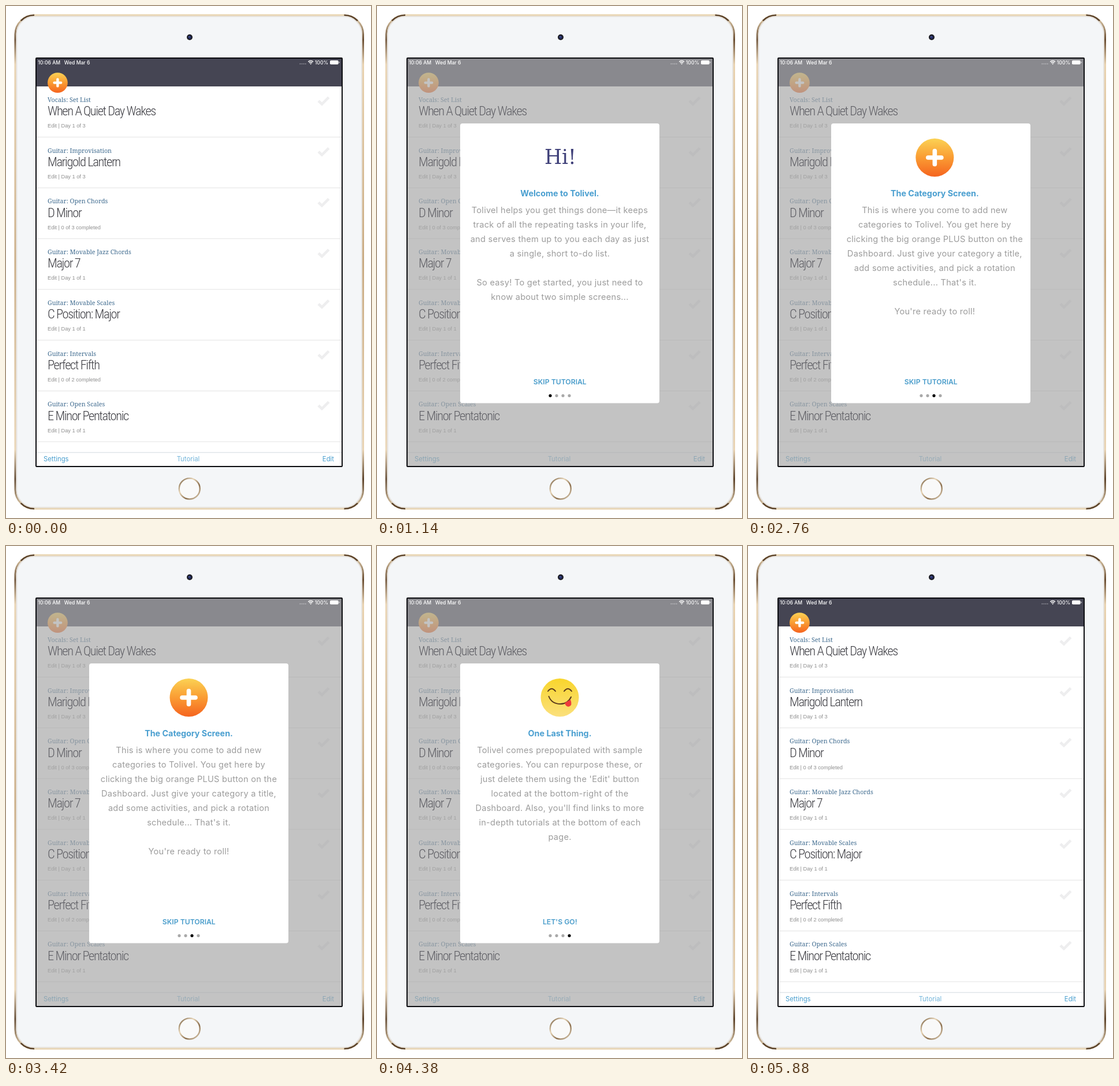
Recreate the animation shown at these times as an HTML page. Size 632 px wide and 885 px high, loop 5940 ms.

```html
<!DOCTYPE html>
<html lang="en">
<head>
<meta charset="utf-8">
<title>Task list tutorial</title>
<style>
  html, body { margin: 0; width: 100%; height: 100%; overflow: hidden; background: #fff; }
  svg { display: block; width: 100vw; height: 100vh; }
  text { font-family: Inter, Roboto, sans-serif; white-space: pre; }
  .cat { font: 10.7px "Noto Serif", serif; fill: #3f6b8f; }
  .name { font-family: "Roboto Condensed", Roboto, "Open Sans", sans-serif;
          font-size: 22.5px; font-weight: 300; font-stretch: 75%; letter-spacing: -1.4px; }
  .sub { font: 9.25px "Liberation Sans", Arial, sans-serif; fill: #8e8e8e; }
  .status { font-size: 8.6px; font-weight: 500; fill: #fff; }
  .link { font-size: 11.3px; fill: #4a9fcf; }
  .mid { text-anchor: middle; }
  .head { font-size: 14.3px; font-weight: 700; fill: #4a9fd0; }
  .body { font-size: 14.6px; letter-spacing: .25px; fill: #9c9c9c; }
  .hi { font: 34.5px "DejaVu Serif", serif; fill: #3f4079; }
  .skip { font-size: 12.2px; font-weight: 600; fill: #4a9dcb; }
</style>
</head>
<body>
<svg viewBox="0 0 632 885" preserveAspectRatio="none">
  <defs>
    <linearGradient id="orange" x1="0" y1="0" x2="0" y2="1">
      <stop offset="0" stop-color="#fbd254"/><stop offset=".5" stop-color="#fa9c33"/><stop offset="1" stop-color="#f5641f"/>
    </linearGradient>
    <linearGradient id="sky" x1="0" y1="0" x2="1" y2="1">
      <stop offset=".1" stop-color="#e6f6fd"/><stop offset="1" stop-color="#9be4fb"/>
    </linearGradient>
    <linearGradient id="tick" gradientUnits="userSpaceOnUse" x1="-20" y1="10" x2="20" y2="-12">
      <stop offset=".3" stop-color="#f4702a"/><stop offset="1" stop-color="#fcc052"/>
    </linearGradient>
    <linearGradient id="face" x1="0" y1="0" x2="0" y2="1">
      <stop offset="0" stop-color="#f8d52c"/><stop offset="1" stop-color="#fbe07c"/>
    </linearGradient>
    <linearGradient id="rim" x1="0" y1="0" x2="0" y2="1">
      <stop offset="0" stop-color="#ead7b5"/><stop offset=".05" stop-color="#6b4f34"/>
      <stop offset=".1" stop-color="#e9d3b1"/><stop offset=".5" stop-color="#c9ab83"/>
      <stop offset=".88" stop-color="#ead5b5"/><stop offset=".94" stop-color="#5e452d"/>
      <stop offset="1" stop-color="#e8d5b4"/>
    </linearGradient>
    <linearGradient id="ring" x1="0" y1="0" x2="1" y2="1">
      <stop offset="0" stop-color="#6d5336"/><stop offset=".35" stop-color="#e8d6b8"/>
      <stop offset=".65" stop-color="#8a6d4b"/><stop offset="1" stop-color="#eadbc2"/>
    </linearGradient>
    <clipPath id="screen"><rect x="53" y="91" width="528" height="704"/></clipPath>
    <clipPath id="card"><rect x="144" y="203" width="345" height="483.5" rx="4"/></clipPath>
  </defs>

  <rect x="16" y="15.8" width="602.5" height="853.2" rx="33" fill="#f4f6f8" stroke="url(#rim)" stroke-width="3"/>
  <rect x="18.4" y="18.2" width="597.7" height="848.4" rx="30.6" fill="none" stroke="#e5e1dc" stroke-width="1.8"/>
  <path d="M25.7 25.5A33 33 0 0 1 49 15.8M608.8 25.5A33 33 0 0 0 585.5 15.8M25.7 859.3A33 33 0 0 0 49 869M608.8 859.3A33 33 0 0 1 585.5 869"
        fill="none" stroke="#5b432b" stroke-width="2.6"/>
  <circle cx="318" cy="54" r="5" fill="#1b1c24"/>
  <circle cx="318" cy="54" r="2.6" fill="#27306c"/>
  <circle cx="317" cy="53" r="1" fill="#5060a0"/>
  <circle cx="317.8" cy="834.4" r="18" fill="#f9f9f9" stroke="url(#ring)" stroke-width="2.4"/>
  <rect x="52" y="90" width="530" height="706" rx="1" fill="#fff" stroke="#0b0c10" stroke-width="2"/>

  <g clip-path="url(#screen)">
    <rect x="53" y="91" width="528" height="48" fill="#454553"/>
    <g id="rows"></g>
    <path d="M53 771.8H581" stroke="#d3dbdf"/>
    <text class="link" x="65" y="787.3">Settings</text>
    <text class="link mid" x="315.5" y="787.3" fill-opacity=".78">Tutorial</text>
    <text class="link" x="568" y="787.3" text-anchor="end">Edit</text>
    <g id="add" transform="translate(89.4 132.6)"></g>
    <rect id="shade" x="53" y="91" width="528" height="704" fill="#a8a8a8"/>
    <g id="names"></g>
    <text class="status" x="55.3" y="100.5">10:06 AM</text>
    <text class="status" x="100.8" y="100.5">Wed Mar 6</text>
    <text class="status" x="558" y="100.5" text-anchor="end">100%</text>
    <path d="M508.5 100h11" stroke="#fff" stroke-opacity=".45" stroke-width="1.6" stroke-dasharray="1.8 1.3"/>
    <g fill="none" stroke="#fff" stroke-width="1.5">
      <path d="M523.3 96.4Q527.6 92.6 531.9 96.4M525 98.4Q527.6 96.2 530.2 98.4"/>
    </g>
    <circle cx="527.6" cy="100" r="1" fill="#fff"/>
    <rect x="561" y="94" width="14.6" height="7" rx="1.8" fill="#fff"/>
    <path d="M577 96.3v2.4" stroke="#fff"/>

    <g id="modal">
      <rect x="144" y="203" width="345" height="483.5" rx="4" fill="#fff"/>
      <g clip-path="url(#card)"><g id="pages"></g></g>
      <text id="skip" class="skip mid" x="316.8" y="654.4"></text>
      <g id="dots"></g>
    </g>
  </g>
</svg>
<script>
const LOOP = 5940, STEP = 60, PAGE = 345, MID = 316.5, DROP = 703;
const slides = [1380, 2410, 3782], SLIDE = 480;
const $ = id => document.getElementById(id);
const clamp = v => Math.max(0, Math.min(1, v));
const part = (t, start, length) => clamp((t - start) / length);
const text = (cls, x, y, s) => `<text class="${cls}" x="${x}" y="${y}">${s}</text>`;

const plus = (r, arm, w) => `<circle r="${r}" fill="url(#orange)"/>
  <path d="M${-arm} 0H${arm}M0 ${-arm}V${arm}" stroke="#fff" stroke-width="${w}" stroke-linecap="round"/>`;

const tick = `<circle r="32.7" fill="url(#sky)"/>
  <path d="M-18 1L-6.5 11.5L17.5 -12" fill="none" stroke="url(#tick)" stroke-width="8.5"/>`;

const face = `<circle r="33" fill="url(#face)"/>
  <g fill="none" stroke="#5b3a1c" stroke-width="2" stroke-linecap="round">
    <path d="M-20.5 -11Q-14 -19.5 -7.5 -11M7.5 -11Q14 -19.5 20.5 -11"/>
    <path d="M-19 -2Q-14 11 1 11Q14 11 19.5 -1"/>
  </g>
  <path d="M8.5 9.3L18.5 3.6Q22.5 14 16 15.6Q10.5 16.5 8.5 9.3Z" fill="#ee3b3b"/>`;

const rows = [
  ["Vocals: Set List", "When A Quiet Day Wakes", "Day 1 of 3"],
  ["Guitar: Improvisation", "Marigold Lantern", "Day 1 of 3"],
  ["Guitar: Open Chords", "D Minor", "0 of 3 completed"],
  ["Guitar: Movable Jazz Chords", "Major 7", "Day 1 of 1"],
  ["Guitar: Movable Scales", "C Position: Major", "Day 1 of 1"],
  ["Guitar: Intervals", "Perfect Fifth", "0 of 2 completed"],
  ["Guitar: Open Scales", "E Minor Pentatonic", "Day 1 of 1"]
];

const pages = [
  { head: "Welcome to Tolivel.", lines: [
    "Tolivel helps you get things done—it keeps", "track of all the repeating tasks in your life,",
    "and serves them up to you each day as just", "a single, short to-do list.", "",
    "So easy! To get started, you just need to", "know about two simple screens..."] },
  { icon: tick, head: "The Dashboard.", lines: [
    "It's like a traditional to-do list, but with", "awesome super powers—it automatically",
    "changes each day to help you get ALL THE", "THINGS done!"] },
  { icon: plus(33, 11.5, 7.6), head: "The Category Screen.", lines: [
    "This is where you come to add new", "categories to Tolivel. You get here by",
    "clicking the big orange PLUS button on the", "Dashboard. Just give your category a title,",
    "add some activities, and pick a rotation", "schedule... That's it.", "", "You're ready to roll!"] },
  { icon: face, head: "One Last Thing.", lines: [
    "Tolivel comes prepopulated with sample", "categories. You can repurpose these, or",
    "just delete them using the 'Edit' button", "located at the bottom-right of the",
    "Dashboard. Also, you'll find links to more", "in-depth tutorials at the bottom of each", "page."] }
];

const rowY = i => i * 87.75;
$("rows").innerHTML = rows.map(([cat, , sub], i) => `<g transform="translate(0 ${rowY(i)})">
  ${text("cat", 72, 165.8, cat)}${text("sub", 72, 210.2, "Edit | " + sub)}
  <path d="M541 164L547 169.6L558.8 157.8" fill="none" stroke="#eeeeef" stroke-width="4.6"/>
  <path d="M53 226.6H581" stroke="#e3e3e3"/></g>`).join("");
$("names").innerHTML = rows.map((r, i) => text("name", 72, 189 + rowY(i), r[1])).join("");
$("add").innerHTML = plus(17.4, 5.8, 4.4);

$("pages").innerHTML = pages.map((p, i) => {
  const x = MID + i * PAGE;
  const top = p.icon ? `<g transform="translate(${x} 262)">${p.icon}</g>` : text("hi mid", x + 1, 273, "Hi!");
  return top + text("head mid", x, 329, p.head) +
    p.lines.map((s, n) => text("body mid", x, 358 + n * 25, s)).join("");
}).join("");
$("dots").innerHTML = pages.map((p, i) => `<circle cx="${300 + i * 11}" cy="673.6" r="2.6"/>`).join("");

function draw(t) {
  const rise = DROP * Math.pow(1 - part(t, 60, 480), 4.33);
  const fall = DROP * Math.pow(part(t, 5320, 320), 2.37);
  const shade = part(t, 60, 560) * (1 - part(t, 5320, 320));
  const moves = slides.map(s => 1 - Math.pow(1 - part(t, s, SLIDE), 3));
  const scroll = PAGE * moves.reduce((a, b) => a + b);
  const page = moves.filter(m => m > .9).length;

  $("modal").setAttribute("transform", `translate(0 ${(rise + fall).toFixed(2)})`);
  $("pages").setAttribute("transform", `translate(${(-scroll).toFixed(2)} 0)`);
  $("shade").setAttribute("opacity", .69 * shade);
  const v = Math.round(62 + 34 * shade);
  $("names").setAttribute("fill", `rgb(${v},${v},${v + 6})`);
  $("skip").textContent = page === 3 ? "LET'S GO!" : "SKIP TUTORIAL";
  [...$("dots").children].forEach((d, i) => d.setAttribute("fill", i === page ? "#000" : "#a9a9a9"));
}

const begin = performance.now();
function tickFrame(now) {
  const t = Math.max(0, now - begin) % LOOP;
  draw(Math.floor(t / STEP) * STEP);
  requestAnimationFrame(tickFrame);
}
draw(0);
requestAnimationFrame(tickFrame);
</script>
</body>
</html>
```
